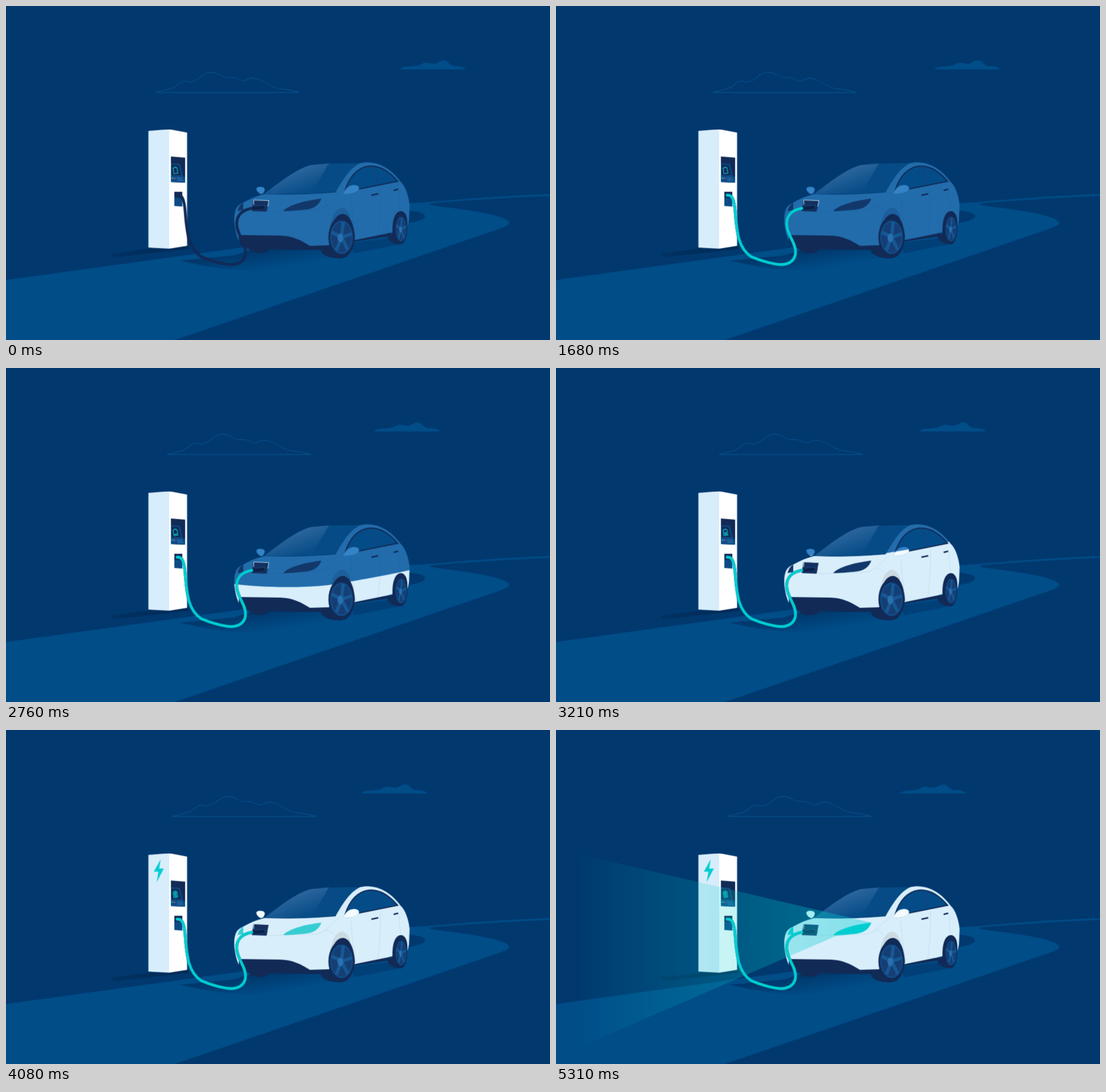
These frames come from a looping animation (955x587 px, 5.4 s). An HTML page:

```html
<!DOCTYPE html>
<html lang="en">
<head>
<meta charset="utf-8">
<title>Charging car</title>
<style>
  :root {
    --night: #01386e; --road: #004d88; --navy: #122a56;
    --blue: #226cab; --pale: #d8eefb; --teal: #00ced1;
  }
  html, body { margin: 0; width: 100%; height: 100%; overflow: hidden; background: var(--night); }
  svg { display: block; width: 100vw; height: 100vh; }
  .navy { fill: var(--navy); }
  .road { fill: var(--road); }
  .teal { fill: var(--teal); }
  .line { fill: none; }

  .paint { --body: var(--blue); --mirror: #3383c6; --arch: #1c5f9c; --seam: #2068a6; }
  .paint.charged { --body: var(--pale); --mirror: #f3fbff; --arch: #ccdae2; --seam: #c3dcec; }
  .body { fill: var(--body); }
  .mirror { fill: var(--mirror); }
  .arch { fill: var(--arch); }
  .seam { fill: none; stroke: var(--seam); stroke-width: .9; }

  .cable { fill: none; stroke: var(--navy); stroke-width: 5; }
  .flow { stroke: var(--teal); stroke-linecap: round; stroke-dasharray: 1 2; }

  .anim { animation: 5.4s linear infinite; }
  .cloud-left { animation-name: drift-right; }
  .cloud-right { animation-name: drift-left; }
  .flow { animation-name: flow; }
  .level { animation-name: level; }
  .cover { animation-name: cover; transform-origin: 297px 283px; }
  .bolt { animation-name: bolt; }
  .lamp { animation-name: lamp; }
  .beam { animation-name: beam; }

  @keyframes drift-right { to { transform: translateX(39.1px); } }
  @keyframes drift-left { to { transform: translateX(-89.5px); } }
  @keyframes flow {
    0% { stroke-dashoffset: 1.02; animation-timing-function: cubic-bezier(.55, 0, .6, 1); }
    31.11%, 100% { stroke-dashoffset: 0; }
  }
  @keyframes level {
    0%, 32.22% { transform: translateY(40px); }
    42.22% { transform: translateY(30px); }
    51.11% { transform: translateY(0); }
    52.78% { transform: translateY(-8px); }
    59.44% { transform: translateY(-54px); }
    63.33% { transform: translateY(-78px); }
    70%, 100% { transform: translateY(-110px); }
  }
  @keyframes cover {
    0% { transform: scaleY(1); animation-timing-function: step-end; }
    46.5% { transform: scaleY(.75); animation-timing-function: step-end; }
    55.5% { transform: scaleY(.5); animation-timing-function: step-end; }
    62% { transform: scaleY(.25); animation-timing-function: step-end; }
    68%, 100% { transform: scaleY(0); }
  }
  @keyframes bolt {
    0%, 66.67% { opacity: 0; }
    70.37%, 100% { opacity: 1; }
  }
  @keyframes lamp {
    0%, 66.67% { fill: #12386b; }
    72.2%, 75.9% { fill: #36cdd2; }
    79.44%, 100% { fill: #00ced1; }
  }
  @keyframes beam {
    0%, 71.1% { opacity: 0; }
    73.33%, 74.44% { opacity: 1; }
    75.5%, 76% { opacity: 0; }
    79.44%, 100% { opacity: 1; }
  }
</style>
</head>
<body>
<!-- Coordinates are pixel centres, hence the half-pixel origin -->
<svg viewBox="-.5 -.5 955 587" preserveAspectRatio="none">
  <defs>
    <linearGradient id="glass" gradientUnits="userSpaceOnUse" x1="508" y1="280" x2="525" y2="326">
      <stop offset="0" stop-color="#336aa1"/>
      <stop offset="1" stop-color="#074d88"/>
    </linearGradient>
    <linearGradient id="light" gradientUnits="userSpaceOnUse" x1="30" y1="0" x2="553" y2="0">
      <stop offset="0" stop-color="#00ced1" stop-opacity="0"/>
      <stop offset=".15" stop-color="#00ced1" stop-opacity=".08"/>
      <stop offset="1" stop-color="#00ced1" stop-opacity=".4"/>
    </linearGradient>
    <linearGradient id="shade" gradientUnits="userSpaceOnUse" x1="450" y1="428" x2="456" y2="463">
      <stop offset="0" stop-color="#01386c"/>
      <stop offset="1" stop-color="#01386c" stop-opacity="0"/>
    </linearGradient>
    <linearGradient id="post-shade" gradientUnits="userSpaceOnUse" x1="183" y1="0" x2="318" y2="0">
      <stop offset="0" stop-color="#013263"/>
      <stop offset="1" stop-color="#012a55"/>
    </linearGradient>

    <path id="cable" pathLength="1" d="M300 332C309 331 312 339 314 360C317 400 320 425 342 440C362 449 385 454 396 454C413 453 420 443 420 432C420 416 409 407 405 388C402 368 414 358 431 355"/>
    <g id="lamps">
      <path d="M486 360C495 350 520 342 553 338C550 348 540 356 528 357C510 359 498 360 486 360Z"/>
      <path d="M416 345L416 358L406 360C408 352 411 348 416 345Z"/>
    </g>
    <g id="shell">
      <path class="body" d="M416 345C428 338 440 333 453 330C495 332 540 330 578 327C590 305 605 282 620 276C650 269 675 285 692 308C701 316 707 335 708 350L707 375C706 383 704 388 703 390L670 399L611 411L567 421H530L480 404L409 403L408 412C401 396 398 372 402 360C404 352 409 348 416 345Z"/>
      <path class="seam" d="M460 361L545 358C560 355 567 345 585 328M560 352C570 350 572 356 575 360M605 335C607 365 610 390 613 409M657 318C657 345 656 380 652 401M690 323C689 335 691 348 692 357"/>
      <path class="arch" d="M569 388C573 353 595 341 605 372L592 372Z"/>
    </g>
    <g id="mirrors" class="mirror">
      <path d="M592 330C594 322 599 315 610 314C618 314 620 318 619 322C614 328 604 329 592 330Z"/>
      <path d="M439 320C441 317 445 317 448 317.500C453 318 455 321 453 325C452 328 450 330 447 330C442 328 439 324 439 320Z"/>
    </g>
    <g id="rim">
      <ellipse rx="20" ry="29.5" fill="#0f4d89"/>
      <ellipse rx="17.5" ry="26.5" fill="#163e74"/>
      <path class="line" stroke="#165894" stroke-width="6" d="M0 0L3 -27M0 0L18 -6M0 0L11 22M0 0L-9 23M0 0L-17 -9"/>
      <ellipse cx="-2" cy="1" rx="5" ry="7.5" fill="#2a70b0"/>
    </g>
    <clipPath id="filled">
      <path class="anim level" d="M380 376C420 384 500 388 566 381C610 374 670 364 720 352V600H380Z"/>
    </clipPath>
  </defs>

  <path class="anim cloud-left line" stroke="#084f89" stroke-width="1.3" d="M262 151.500C275 147 290 147 299 139C307 131 312 130 320 133C338 134 342 116 360 116C374 116 377 126 388 125C396 125 404 125 410 130C418 134 420 128 432 126C450 127 462 143 480 145C495 146 505 148 515 151.500Z"/>
  <path class="anim cloud-right road" d="M691 111C697 104 706 107 716 105C726 105 730 98 738 99C748 101 752 102 757 99C763 95 770 93 775 98C781 104 785 106 793 105C800 106 804 107 807 111Z"/>

  <path class="road" d="M690 347L740 344C810 338 885 332 960 330V333C885 336 810 341 760 345C735 347 735 349 780 354C850 363 883 372 883 381C883 385 870 390 840 400L292 588H-1V481L420 423L700 382C725 378 735 374 735 369C735 362 715 359 690 358Z"/>

  <!-- Ground shadows -->
  <path fill="url(#post-shade)" d="M183 435L250 426L286 426L318 421L322 426L190 441Z"/>
  <path fill="url(#shade)" d="M305 447L400 438L430 428L600 420L610 437L520 460C460 470 380 466 305 447Z"/>
  <path fill="#013f77" d="M605 416L675 407L692 418L610 434Z"/>

  <!-- Charging post -->
  <path fill="#d8edfb" d="M249.500 219L286 216V426L249.500 424Z"/>
  <path fill="#fff" d="M286 216L317.400 222V421L286 426Z"/>
  <path class="navy" d="M289 264L314 266V310L289 309Z"/>
  <path fill="#0c4c87" d="M289 276L305 277L310 299L314 300V310L289 309Z"/>
  <path class="navy" d="M290 278L303 279L307 297L290 297Z"/>
  <circle class="teal" cx="291.700" cy="302" r="1.200"/>
  <circle cx="295.300" cy="302.300" r="1.200" fill="#e0525f"/>
  <path class="line" stroke="#3978b2" stroke-width="1.300" stroke-dasharray="2 1" d="M299.500 301.500H309M300.500 304H310M301 306.500H311"/>
  <g transform="rotate(-9 297 289)">
    <path class="line" stroke="#00ced1" stroke-width="1.600" d="M294.500 285.500H299.500M294.500 287.700H299.500M294.500 289.900H299.500M294.500 292.100H299.500"/>
    <rect class="anim cover navy" x="294" y="283" width="6" height="10"/>
    <path class="line" stroke="#00ced1" stroke-width="1.100" d="M293.500 284H295.500V282.600H298.500V284H300.500V294H293.500Z"/>
  </g>
  <path fill="#0c4a85" d="M295 326H309V352L295 351Z"/>
  <path class="navy" d="M295 326H309V338L295 336Z"/>
  <path class="anim bolt teal" d="M271 227L259 248.500H267L264 267L276.500 243H268.500Z"/>

  <!-- Car -->
  <path class="navy" d="M424 424H464C460 432 450 435 438 433C431 431 426 428 424 424Z"/>
  <path class="navy" d="M608 409L674 396V404L608 414Z"/>
  <use href="#shell" class="paint"/>
  <use href="#shell" class="paint charged" clip-path="url(#filled)"/>

  <path fill="url(#glass)" d="M453 329.500C480 309 510 285 535 279L568 276L548 328.500C515 330 480 330 453 329.500Z"/>
  <path fill="#064b85" d="M566 276.500L622 275.500C604 283 590 305 578 326L536 329Z"/>
  <path fill="#044c88" stroke="#122a56" stroke-width="2" d="M595 323C602 302 615 284 636 281C656 279 673 291 687 307.500L610 323Z"/>
  <path class="line" stroke="#1b4078" stroke-width="1.500" d="M640 281C646 291 651 303 653 314"/>
  <path class="line" stroke="#122a56" stroke-width="2.800" d="M641 332L653 329.500M680 323.500L688 321.500"/>
  <use href="#mirrors" class="paint"/>
  <use href="#mirrors" class="paint charged" clip-path="url(#filled)"/>

  <use href="#lamps" class="anim lamp"/>
  <path class="navy" d="M408 402L480 403C502 403 519 412 533 421L567 420V428L520 428L460 427L417 425C411 420 408 412 408 402Z"/>

  <!-- Wheels -->
  <path class="navy" d="M567 421C567 388 576 364 592 365C604 367 611 385 612 409L570 425Z"/>
  <path class="navy" d="M552 427L570 418L600 438C593 444 580 444 568 441C558 438 552 433 552 427Z"/>
  <ellipse class="navy" cx="588.500" cy="406" rx="23" ry="36"/>
  <use href="#rim" transform="translate(588.5 406)"/>
  <path class="navy" d="M678 398C677 370 685 359 694 360C702 362 705 372 704 388L684 408Z"/>
  <path class="navy" d="M669 404L680 397L695 417C685 420 670 414 669 404Z"/>
  <ellipse class="navy" cx="692" cy="391" rx="12" ry="27.500"/>
  <use href="#rim" transform="translate(693 391.5) scale(.48 .73)"/>

  <!-- Socket and cable -->
  <path fill="#15305f" d="M434 340L461 342L457 361L431 360Z"/>
  <path class="line" stroke="#d8eefb" stroke-width=".9" d="M434.500 349V340.500L461 341.500L459 352"/>
  <use href="#cable" class="cable"/>
  <path class="line" stroke="#0b2148" stroke-width="6" stroke-linecap="round" d="M434 354.500L450 353"/>
  <path class="line" stroke="#1d4b84" stroke-width="1.200" d="M436 351.500L452 349.500L457 352"/>
  <use href="#cable" class="anim cable flow"/>

  <path class="anim beam" fill="url(#light)" d="M25 214L553 338L528 358L490 362L15 568Z"/>
</svg>
</body>
</html>
```
